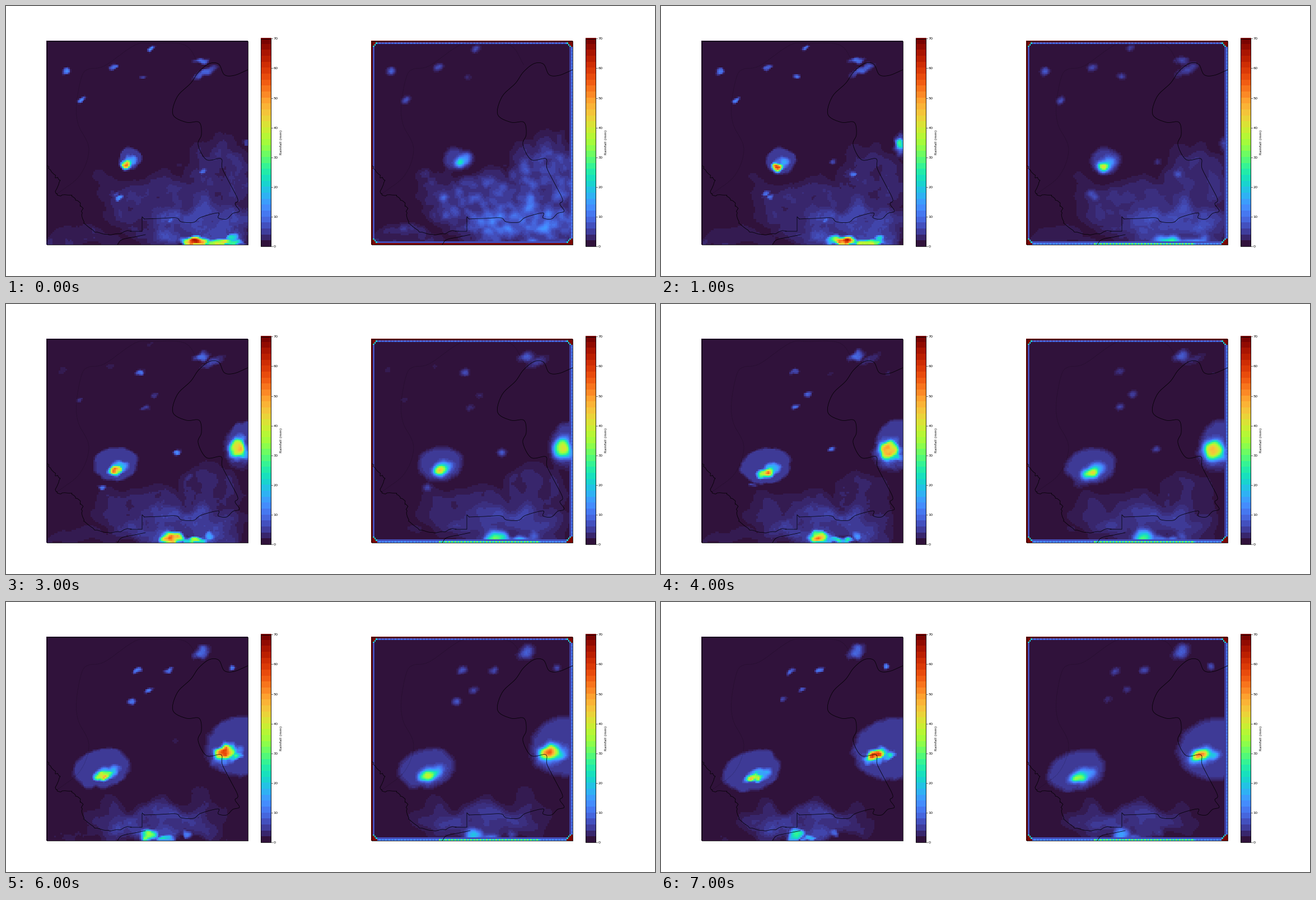
A matplotlib script that plays this animation: 1159 px wide and 483 px high, repeating every 8 s.

```python
import numpy as np
import matplotlib.pyplot as plt
from matplotlib.animation import FuncAnimation
from matplotlib.patches import Rectangle

W, H, DPI = 1159, 483, 100
N, STEPS = 128, 8
LEFT, RIGHT, TOP, BOTTOM = 72, 432, 62, 427
SHIFT = 580
PX = 72 / DPI
plt.rcParams["font.family"] = "DejaVu Sans"

X, Y = np.meshgrid(LEFT + (np.arange(N) + .5) * (RIGHT - LEFT) / N,
                   TOP + (np.arange(N) + .5) * (BOTTOM - TOP) / N)
rng = np.random.default_rng(12)


def blur(a, s):
    r = int(3 * s) + 1
    k = np.exp(-.5 * (np.arange(-r, r + 1) / s) ** 2)
    k /= k.sum()
    a = np.pad(a, r, mode="edge")
    for axis in (0, 1):
        a = np.apply_along_axis(np.convolve, axis, a, k, "valid")
    return a


def noise(s):
    n = blur(rng.standard_normal((N, N)), s)
    return n / n.std()


ragged = noise(1.6), noise(1.6)
billow = noise(5), noise(5)
mottle, patches, speckle = noise(2.6), noise(1.3), noise(.7)


def mix(a, b, s):
    return np.add(a, s * np.subtract(b, a))


def ellipse(warp, size, x, y, rx, ry, rot):
    """Distance from an ellipse centre, 1 on its ragged outline."""
    dx, dy = X - x + size * warp[0], Y - y + size * warp[1]
    c, s = np.cos(np.radians(rot)), np.sin(np.radians(rot))
    return np.hypot((dx * c + dy * s) / rx, (dy * c - dx * s) / ry)


def anvil(x, y, rx, ry, rot, amp):
    return amp * np.clip((1.08 - ellipse(ragged, 1.2, x, y, rx, ry, rot)) * 6, 0, 1)


def core(x, y, rx, ry, rot, amp, broken=.08):
    r = ellipse(ragged, 1.5, x, y, rx, ry, rot)
    return amp * np.exp(-r ** 3) * np.clip(1 + broken * patches, .2, 1.25)


def sheet(x, y, rx, ry, amp):
    r = ellipse(billow, 9, x, y, rx, ry, 0)
    return amp * np.clip((1 - r) / .5, 0, 1) * (1 + .13 * mottle + .04 * speckle)


def west_storm(s, ease, miss):
    x, y = mix((216, 284), (165, 315), s)
    x, y = x + 15 * miss, y - 4 * miss
    rx, tilt = 8 + 10 * ease, -15 * s
    amp = mix(52, 40, s) * (1 - .4 * miss)
    return [anvil(*mix((222, 273, 19, 21), (162, 302, 53, 36), (s, s, ease, ease)),
                  tilt, 4.5),
            core(x + 8, y - 6, 1.4 * rx, 13, tilt, 13 + 4 * s, .25),
            core(x, y, rx, 9, tilt, amp, .06 + .25 * s)]


def east_storm(s, ease, miss):
    x, y = mix((436, 244), (384, 274), s)
    rx, ry = 6 + 14 * ease, 8 + 9 * np.sin(np.pi * s)
    known = (1 - miss) ** 6
    rain = known * (6 + 54 * np.sqrt(ease))
    return [anvil(432 - 19 * s ** 2, 244 + 18 * s ** 2, 5 + 65 * s, 8 + 47 * ease,
                  -12 * s, 4.5 * known),
            core(x + 3, y + 2, 1.45 * rx, 1.4 * ry + 4, -10 * s, .3 * rain, .2),
            core(x + 20 * s, y + 14 * np.sin(np.pi * s), 14, 8, 0, .5 * rain, .2),
            core(x, y, rx, ry, -22 * s ** 2, rain, .1)]


def south_storm(s, known):
    x, y = mix((338, 421), (241, 416), s)
    return [core(x, y, 24 - 11 * s, 9 + 2 * s, 0, known * (60 - 33 * s ** 2), .1),
            core(x + 47 - 20 * s, 423, 33 - 20 * s, 6, 0, known * (42 - 24 * s), .15),
            core(x + 67, 414, 10 - 3 * s, 8, 0, known * (22 - 13 * s))]


def rain_shield(s, miss):
    wet = 1 + .7 * miss * np.abs(patches + mottle)
    sheets = [((345, 402, 155, 84, 4.9), (252, 402, 140, 56, 4.4)),
              ((285, 345, 160, 60, 2.7), (240, 397, 150, 52, 2.2)),
              ((385, 300, 75, 82, 2.6), (330, 390, 75, 45, 1.6)),
              ((130, 424, 95, 34, 1.9), (150, 430, 80, 20, .9))]
    return [wet * sheet(*mix(a, b, s)) for a, b in sheets]


# where a shower peaks, its drift per step, and when it peaks
SHOWERS = [((107, 117), (-2.5, .7), 0), ((192, 110), (-2, .8), 0),
           ((259, 78), (-1, -2), 0), ((133, 168), (-1.2, 1), .5),
           ((241, 125), (-2, -1), 2), ((203, 342), (-8, 0), 0),
           ((292, 383), (0, 0), .5), ((347, 297), (-8, 5), .5),
           ((307, 267), (-1, -6), 3), ((180, 332), (-8, -3), 2),
           ((234, 180), (-7, -2.5), 5), ((258, 159), (-3, -2), 5.5),
           ((283, 122), (-7, -1), 7), ((402, 117), (-1.5, -2.5), 7),
           ((234, 124), (-2.5, 1.5), 6)]


def showers(t):
    out = []
    for p, v, peak in SHOWERS:
        x, y = np.add(p, np.multiply(v, t - peak))
        out.append(core(x, y, 7, 4, -25, 12 * np.exp(-((t - peak) / 2.2) ** 2)))
    return out


def northern_cluster(s, known):
    fade = known * np.clip(1.5 - 2 * s, 0, 1)
    return [core(349, 98 - 10 * s, 13 + 3 * s, 5 + 6 * s, -30 * s, 10 * known),
            core(*mix((355, 120), (385, 85), s), 22, 6, -28, 8 * fade)]


def rainfall(t, miss=0):
    s = t / (STEPS - 1)
    ease = 1 - (1 - s) ** 1.7
    fields = (rain_shield(s, miss) + showers(t) + northern_cluster(s, 1 - miss)
              + west_storm(s, ease, miss) + east_storm(s, ease, miss)
              + south_storm(s, 1 - miss))
    return np.max(fields, axis=0)


def rim(f, t):
    """Edge artefacts of the forecast grid."""
    i = np.arange(N)
    dots, mid = i % 2, (i > .33 * N) & (i < .83 * N)
    f[1] = 6 + 3 * dots
    f[:, 1] = f[-2] = 6
    f[:, -2] = np.maximum(f[:, -2], 4)
    f[:, -1] = np.maximum(f[:, -1], 8 + 2 * dots)
    f[-1] = np.where(mid, 19 + 11 * dots, 9 + 4 * dots) if t else 70
    f[0] = f[:, 0] = 70
    a, b = np.meshgrid(i, i)
    for x, y in ((a, b), (N - 1 - a, b), (a, N - 1 - b), (N - 1 - a, N - 1 - b)):
        f[x + y <= 3] = 70
        f[(x + y == 4) & (x > 0) & (y > 0)] = 20
    return f


def forecast(t):
    f = blur(rainfall(t, np.exp(-1.5 * t)), 1.15)
    return rim(f * (1 - .38 * np.clip((Y - 398) / 12, 0, 1)), t)


def curve(points, n=6):
    """Catmull-Rom curve through a few points."""
    p = np.array(points, float)
    p = np.vstack([2 * p[0] - p[1], p, 2 * p[-1] - p[-2]])
    u = np.linspace(0, 1, n, endpoint=False)[:, None]
    out = [b + u / 2 * (c - a + u * (2 * a - 5 * b + 4 * c - d
                                     + u * (3 * (b - c) + d - a)))
           for a, b, c, d in zip(p, p[1:], p[2:], p[3:])]
    return np.vstack(out + [p[-2:-1]])


RIVER = [(432, 114), (408, 124), (390, 123), (380, 104), (363, 103), (344, 118),
         (330, 138), (306, 162), (298, 194), (322, 208), (345, 208), (349, 230),
         (343, 248), (358, 275), (384, 273), (386, 290), (399, 316), (414, 346),
         (409, 354), (417, 367), (405, 371), (394, 381), (379, 379), (379, 370),
         (348, 378), (335, 387), (313, 386), (304, 379), (275, 380), (247, 381)]
STEP = [(247, 381), (243, 377), (243, 403), (222, 403)]
COAST = [(72, 284), (88, 302), (95, 314), (90, 337), (115, 339), (130, 350),
         (136, 365), (140, 387), (158, 403), (188, 408), (222, 403)]
ISLE = [(199, 427), (207, 418), (230, 413), (249, 409)]
INLAND = [(90, 337), (132, 303), (148, 255), (129, 212), (126, 175), (135, 127),
          (147, 113), (176, 107), (230, 70), (262, 67), (320, 70), (345, 106)]

coast = curve(COAST)
coast += np.random.default_rng(4).normal(0, 1.3, coast.shape)
LINES = [curve(RIVER), np.array(STEP), coast, curve(ISLE)]

fig = plt.figure(figsize=(W / DPI, H / DPI), dpi=DPI, facecolor="white")
ax = fig.add_axes([0, 0, 1, 1])
ax.axis("off")


def outline(x0, y0, x1, y1):
    box = Rectangle((x0 + .5, y0 + .5), x1 - x0 - 1, y1 - y0 - 1, fill=False,
                    ec="black", lw=.8 * PX, zorder=4)
    return ax.add_patch(box)


def picture(data, vmax, x0, y0, x1, y1):
    return ax.imshow(data, cmap="turbo", vmin=0, vmax=vmax, aspect="auto",
                     interpolation="nearest", extent=(x0, x1, y1, y0))


def panel(dx):
    area = LEFT + dx, TOP, RIGHT + dx, BOTTOM
    img = picture(np.zeros((N, N)), 70, *area)
    frame = outline(*area)
    for p in LINES:
        line, = ax.plot(p[:, 0] + dx, p[:, 1], color="black", lw=.75 * PX)
        line.set_clip_path(frame)
    p = curve(INLAND)
    ax.plot(p[:, 0] + dx, p[:, 1], ":", color="black", lw=.7 * PX, alpha=.5)
    scale(dx)
    return img


def scale(dx):
    x0, x1, y0, y1 = 454.5 + dx, 473.5 + dx, 58, 430.5
    picture(np.linspace(1, 0, 35)[:, None], 1, x0, y0, x1, y1)
    outline(x0, y0, x1, y1)
    for v in range(0, 71, 10):
        y = mix(430, 58.4, v / 70)
        ax.plot([x1, x1 + 2.2], [y, y], color="black", lw=.6 * PX)
        ax.text(x1 + 4.2, y, str(v), size=6.5 * PX, va="center_baseline")
    ax.text(491 + dx, 244, "Rainfall (mm)", size=6.5 * PX, rotation=90,
            ha="center", va="center")


truth, guess = panel(0), panel(SHIFT)
ax.set_xlim(0, W)
ax.set_ylim(H, 0)


def update(t):
    truth.set_data(np.floor(rainfall(t)))
    guess.set_data(np.floor(forecast(t)))
    return truth, guess


anim = FuncAnimation(fig, update, frames=STEPS, interval=1000, repeat=True)
plt.show()
```
